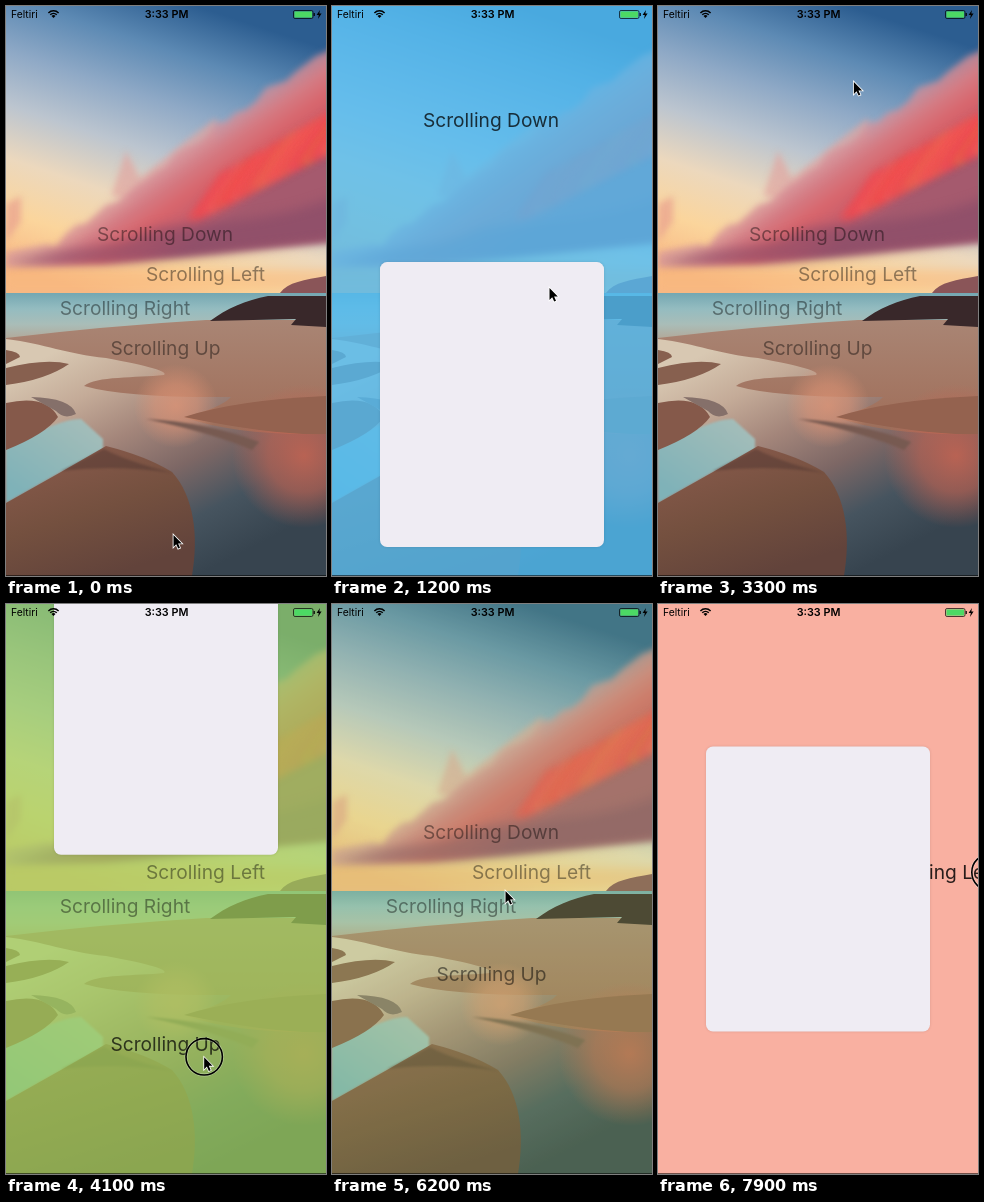
An HTML page with a canvas for the animation above (8000 ms loop, 320 by 570 pixels).

```html
<!DOCTYPE html>
<html lang="en">
<head>
<meta charset="utf-8">
<title>Scrolling transitions</title>
<style>
  html, body { margin: 0; width: 100%; height: 100%; overflow: hidden; background: #000; }
  canvas { display: block; width: 100vw; height: 100vh; }
</style>
</head>
<body>
<canvas id="stage"></canvas>
<script>
const W = 320, H = 570, LOOP = 8000, STEP = 100;
const FONT = 'Inter, "Open Sans", sans-serif';
const scale = window.devicePixelRatio || 1;

function setup(canvas) {
  canvas.width = W * scale;
  canvas.height = H * scale;
  const c = canvas.getContext('2d');
  c.scale(scale, scale);
  return c;
}
const ctx = setup(document.getElementById('stage'));

// ---------- beach backdrop, painted once ----------
function paintBeach() {
  const canvas = document.createElement('canvas');
  const c = setup(canvas);

  // evenly spaced colour stops
  const fade = (x0, y0, x1, y1, ...colors) => {
    const g = c.createLinearGradient(x0, y0, x1, y1);
    colors.forEach((color, i) => g.addColorStop(i / (colors.length - 1), color));
    return g;
  };
  const shape = (fill, d, blur = 0) => {
    c.filter = blur ? `blur(${blur * scale}px)` : 'none';
    c.fillStyle = fill;
    c.fill(new Path2D(d));
  };
  const glow = (x, y, r, rgb, a) => {
    const g = c.createRadialGradient(x, y, 0, x, y, r);
    g.addColorStop(0, `rgba(${rgb},${a})`);
    g.addColorStop(.5, `rgba(${rgb},${a * .7})`);
    g.addColorStop(1, `rgba(${rgb},0)`);
    shape(g, `M${x - r} ${y - r}h${2 * r}v${2 * r}h${-2 * r}Z`);
  };
  let seed = 7;
  const random = () => (seed = seed * 16807 % 2147483647) / 2147483647;

  // sky
  shape(fade(95, 290, 190, 0, '#f8b884', '#fbd59c', '#ecd8bd', '#bcc5cf', '#8fa9c6', '#5d8ab4', '#2c5d90'),
    'M0 0H320V290H0Z');

  // cloud bank under a straight, slightly ragged ridge
  const ridge = x => 235 - (x - 45) * .72;
  let edge = 'M0 262V246';
  for (let x = 40; x <= 330; x += 10) edge += `L${x} ${ridge(x) + random() * 10}`;
  shape('rgba(226,165,160,.7)', 'M105 190L120 145L134 172L185 131L210 112L212 160L150 200Z', 3);
  shape(fade(187, 133, 237, 203, 'rgba(214,150,158,.7)', '#d47c84', '#d8656c', '#c65e6c', '#a55a6e'),
    edge + 'V236L100 258Z', 3);
  for (let i = 0; i < 26; i++) {
    const x = 185 + i * 6, y = 215 - i * 3, len = y - ridge(x);
    c.filter = `blur(${3 * scale}px)`;
    c.strokeStyle = `rgba(${238 + random() * 14},${65 + random() * 40},${68 + random() * 20},.5)`;
    c.lineWidth = 11;
    c.beginPath();
    c.moveTo(x, y);
    c.lineTo(x + len * .42, y - len * .58);
    c.stroke();
  }
  shape('rgba(132,74,104,.6)', 'M0 258C50 240 100 245 150 222C220 214 270 215 330 190V234C250 242 180 255 100 258Z', 6);
  shape('rgba(232,160,142,.7)', 'M0 198L15 190V215L0 236Z', 3);
  shape('rgba(250,185,125,.5)', 'M0 264H330V284H0Z', 4);

  // sea, headland, sand
  shape('#8a5558', 'M274 287C282 276 298 274 320 270V288Z');
  shape(fade(0, 287, 0, 334, '#74a7b2', '#94bcc0', '#a9bdb8', '#b3a797'), 'M0 287H320V334H0Z');
  shape(fade(0, 314, 0, 570, '#a98574', '#a2735f', '#8d6150', '#68443a'),
    'M0 332Q100 320 200 314H320V570H0Z');
  shape('#39282a', 'M204 315C220 303 240 294 262 290H320V321L285 319L290 313Z');

  // tidal streams
  shape(fade(70, 335, 190, 570, '#d8c8b2', '#c4ab98', '#a3857a', '#7d6765', '#46545f', '#37444f'),
    'M0 333C40 338 60 348 100 352Q165 364 158 369C130 372 90 370 78 380Q120 392 225 391Q215 402 178 411Q230 430 320 428V570H0Z');
  glow(298, 450, 72, '196,100,82', .9);
  glow(170, 400, 42, '228,150,118', .7);
  shape(fade(75, 413, 20, 490, '#a3bdb9', '#7fb2b8'), 'M0 442Q55 412 75 413L97 433V446L55 466L0 497Z', 1);
  shape('#87604f', 'M0 344Q14 346 14 351L0 358ZM0 362Q40 352 63 358Q40 374 0 379Z');
  shape('#85594a', 'M0 397Q40 388 52 411Q40 428 0 444Z');
  shape('#85706a', 'M25 391Q65 392 70 408Q58 414 50 405Z');
  shape('#94624f', 'M178 411Q230 394 320 390V428Q270 430 178 411Z');
  shape('#775a51', 'M140 413Q200 416 253 436L246 444Q210 428 140 413Z', 1);
  shape(fade(60, 445, 100, 570, '#86594a', '#74503f', '#62433b'),
    'M0 497L55 466L100 440Q140 450 166 466C188 490 193 530 186 570H0Z', .7);
  shape('rgba(70,48,46,.4)', 'M55 465Q110 458 166 467Q120 455 98 443Z', 1);
  return canvas;
}
const beach = paintBeach();

// ---------- motion ----------
// dx, dy: direction in which label and card travel
const labels = {
  down: { text: 'Scrolling Down', x: 159, y: 235, dx: 0, dy: -1, tint: '80,188,243' },
  left: { text: 'Scrolling Left', x: 199.5, y: 275, dx: 1, dy: 0, tint: '249,176,161' },
  right: { text: 'Scrolling Right', x: 119, y: 309, dx: -1, dy: 0 },
  up: { text: 'Scrolling Up', x: 159.5, y: 349, dx: 0, dy: 1, tint: '158,211,91' }
};

// Each drag runs press..drop; the card then settles by end, open (1) or closed (0).
const drags = [
  { label: labels.down, press: .05, drop: .95, end: 1.8, from: [167, 528], to: [217, 281], goal: 1 },
  { label: labels.down, press: 2.1, drop: 2.6, end: 3.1, from: [150, 79], to: [206, 524], goal: 0 },
  { label: labels.up, press: 3.5, drop: 4.15, end: 4.75, from: [195, 59], to: [198, 499], goal: 1 },
  { label: labels.up, press: 5.55, drop: 6.05, end: 6.5, from: [163, 481], to: [173, 286], goal: 0 },
  { label: labels.left, press: 7.2, drop: 8, end: 8.5, from: [8, 281], to: [398, 265], goal: 1 }
];
const HOLD = .3, READY = .15;

const clamp = u => Math.min(1, Math.max(0, u));
const mix = (a, b, u) => a + (b - a) * u;
const mixPoint = (a, b, u) => a.map((v, i) => mix(v, b[i], u));
const smooth = u => u * u * (3 - 2 * u);
const settle = u => 1 - (1 - u) ** 3;
const flick = u => u ** 1.4;
const span = (t, a, b) => clamp((t - a) / (b - a));

function poseAt(t) {
  const i = Math.max(0, drags.findLastIndex(d => t >= d.press));
  const d = drags[i], next = drags[i + 1];
  let point = mixPoint(d.from, d.to, flick(span(t, d.press, d.drop)));
  const moved = Math.abs(d.label.dx * (point[0] - d.from[0]) / W + d.label.dy * (point[1] - d.from[1]) / H);
  const dragged = clamp(d.goal ? moved : 1 - moved);
  const p = mix(dragged, d.goal, settle(span(t, d.drop, d.end)));

  if (next) point = mixPoint(point, next.from, smooth(span(t, d.drop + HOLD, next.press - READY)));
  const pressed = t > d.press && t < d.drop || !!next && t >= next.press - READY;
  return { active: d.label, p, point, pressed: pressed && !(next && next.label === labels.left && t < next.press) };
}

// ---------- drawing ----------
function text(str, x, y, font, color, align = 'center') {
  ctx.font = `${font} ${FONT}`;
  ctx.fillStyle = color;
  ctx.textAlign = align;
  ctx.fillText(str, x, y);
}

function roundRect(x, y, w, h, r) {
  ctx.beginPath();
  ctx.roundRect(x, y, w, h, r);
}

function drawCard(active, p) {
  const w = W * .7, h = H / 2;
  const x = W / 2 - active.dx * (1 - p) * W - w / 2;
  const y = H / 2 - active.dy * (1 - p) * H - h / 2;
  ctx.save();
  ctx.shadowColor = 'rgba(0,0,0,.12)';
  ctx.shadowBlur = 3 * scale;
  ctx.fillStyle = '#efecf3';
  roundRect(x, y, w, h, 7);
  ctx.fill();
  ctx.restore();
}

function drawStatusBar() {
  text('Feltiri', 5, 12, '10.3px', '#000', 'left');
  text('3:33 PM', 160.5, 12, '600 10.8px', '#000');

  ctx.strokeStyle = ctx.fillStyle = '#000';
  ctx.lineWidth = 1.5;
  for (const r of [7.2, 4.6]) {
    ctx.beginPath();
    ctx.arc(47.5, 12, r, -Math.PI * .75, -Math.PI * .25);
    ctx.stroke();
  }
  ctx.beginPath();
  ctx.moveTo(47.5, 12);
  ctx.arc(47.5, 12, 2.8, -Math.PI * .75, -Math.PI * .25);
  ctx.fill();

  ctx.lineWidth = .7;
  roundRect(287.5, 4.5, 19.5, 8, 1.6);
  ctx.stroke();
  ctx.fillRect(307.6, 7, 1.2, 3);
  ctx.fillStyle = '#4cd964';
  ctx.fillRect(288.4, 5.4, 17.7, 6.2);
  ctx.fillStyle = '#000';
  ctx.fill(new Path2D('M314 4L310.6 9H312.8L312 13L315.6 7.6H313.3Z'));
}

const arrow = new Path2D('M.5 1V13L3.2 10.2L5.2 14.6L7 13.8L5.1 9.5H8.8Z');
function drawPointer([x, y], pressed) {
  if (pressed) {
    ctx.beginPath();
    ctx.arc(x + .5, y + .5, 18.2, 0, Math.PI * 2);
    ctx.strokeStyle = 'rgba(255,255,255,.35)';
    ctx.lineWidth = 3;
    ctx.stroke();
    ctx.strokeStyle = '#000';
    ctx.lineWidth = 1.6;
    ctx.stroke();
  }
  ctx.save();
  ctx.translate(x, y);
  ctx.strokeStyle = '#fff';
  ctx.lineWidth = 1.6;
  ctx.stroke(arrow);
  ctx.fillStyle = '#000';
  ctx.fill(arrow);
  ctx.restore();
}

function draw(t) {
  const { active, p, point, pressed } = poseAt(t);

  ctx.drawImage(beach, 0, 0, W, H);
  ctx.fillStyle = `rgba(${active.tint},${p})`;
  ctx.fillRect(0, 0, W, H);

  for (const l of Object.values(labels)) {
    const q = l === active ? p : 0;
    text(l.text, l.x + l.dx * q * W / 4, l.y + l.dy * q * H / 4,
      '19.2px', `rgba(0,0,0,${.42 + .42 * q})`);
  }
  if (p > 0) drawCard(active, p);
  ctx.fillStyle = 'rgba(0,0,0,.55)';
  ctx.fillRect(0, H - 1, W, 1);
  drawStatusBar();
  drawPointer(point, pressed);
}

const start = performance.now();
function tick() {
  const ms = (performance.now() - start) % LOOP;
  draw(Math.floor(ms / STEP) * STEP / 1000);
  requestAnimationFrame(tick);
}
tick();
</script>
</body>
</html>
```
